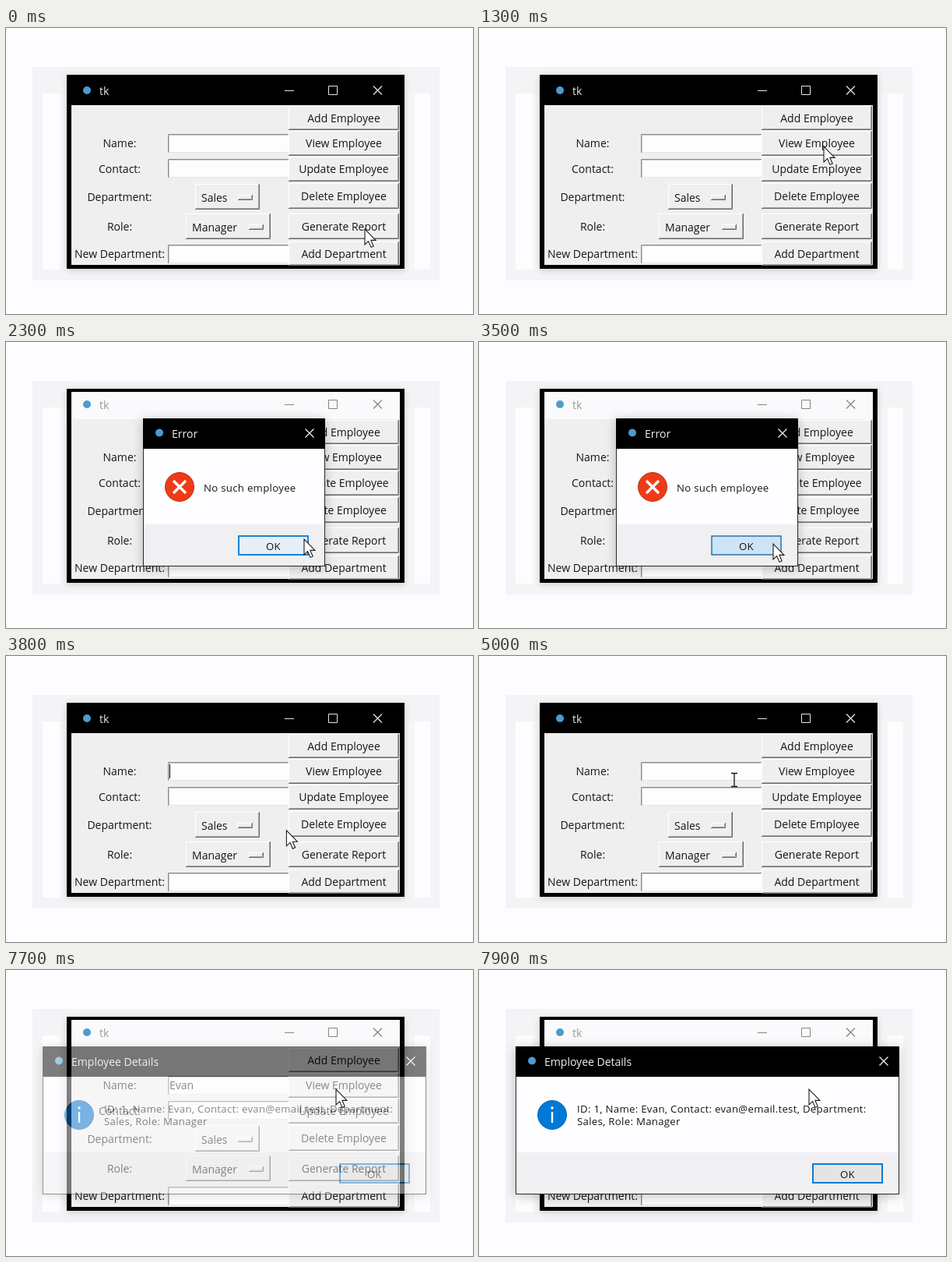
Animation, 600 px wide and 367 px high, one loop 8 s. Source, as an HTML page:

```html
<!DOCTYPE html>
<html lang="en">
<head>
<meta charset="utf-8">
<title>Employee form</title>
<style>
html, body { margin: 0; width: 100%; height: 100%; overflow: hidden; background: #fdfcfe; }
svg { display: block; }
text { font: 14px "Open Sans", "Noto Sans", sans-serif; fill: #161616; white-space: pre; }
.msg text { font-size: 13.2px; letter-spacing: .3px; }
.msg text.head { font-size: 14px; letter-spacing: 0; fill: #f2f2f2; }
.mid { text-anchor: middle; }
.win { filter: drop-shadow(0 2px 4px rgba(0,0,0,.16)); }
.msg .pane { filter: drop-shadow(0 2px 7px rgba(0,0,0,.24)); }
</style>
</head>
<body>
<svg id="stage" width="600" height="367" viewBox="0 0 600 367"></svg>
<script>
const LOOP = 8000, STEP = 100;
const NAME = "Evan", MAIL = "evan@email.test";
const stage = document.getElementById("stage");
const $ = id => document.getElementById(id);

const rect = (x, y, x2, y2, fill, more = "") =>
  `<rect x="${x}" y="${y}" width="${x2 - x}" height="${y2 - y}" fill="${fill}" ${more}/>`;
const line = (d, color, width = 1, more = "") =>
  `<path d="${d}" fill="none" stroke="${color}" stroke-width="${width}" ${more}/>`;
const text = (x, y, s, cls = "", more = "") =>
  `<text x="${x}" y="${y}" class="${cls}" ${more}>${s}</text>`;
const cross = (x, y, r) => `M${x - r} ${y - r}l${2 * r} ${2 * r}m0 ${-2 * r}l${-2 * r} ${2 * r}`;
const badge = (x, y) => `<circle cx="${x}" cy="${y}" r="5" fill="#4d9bd0"/>`;

// Raised box: light top and left edge, dark bottom and right edge
function raised(x, y, x2, y2) {
  return rect(x, y, x2, y2, "#f0eff0") +
    line(`M${x + .5} ${y2}V${y + .5}H${x2}`, "#ffffff") +
    line(`M${x + 1} ${y2 - 1.5}H${x2 - 1.5}V${y + 1}`, "#a4a4a4") +
    line(`M${x} ${y2 - .5}H${x2 - .5}V${y}`, "#696969");
}

function entry(y) {
  return rect(208, y, 363, y + 24, "#fdfcfe") +
    line(`M208.5 ${y + 24}V${y + .5}H363`, "#8b8b8b") +
    line(`M209.5 ${y + 23}V${y + 1.5}H362`, "#c9c9c9") +
    line(`M209 ${y + 23.5}H363`, "#e6e5e6");
}

function menu(x, y, x2, y2, label) {
  const m = Math.round((y + y2) / 2) - 3;
  return raised(x, y, x2, y2) + text(x + 8, m + 8.5, label) + raised(x2 - 28, m, x2 - 9, m + 7);
}

const button = (y, y2, label, base) => raised(363, y, 505, y2) + text(434, base, label, "mid");

function titleBar(id, fill, ink, glyph) {
  return `<g id="${id}">` + rect(84, 64, 506, 99, fill) + text(120, 85.5, "tk", "", `style="fill:${ink}"`) +
    line("M358 80.5H370M414.5 74.5H425.5V85.5H414.5Z", glyph) +
    line(cross(477.5, 80, 5.5), glyph, 1.2) + `</g>`;
}

function dialog(id, x, x2, head, okX, body) {
  return `<g id="${id}" class="msg">` +
    rect(x, 98, x2, 288, "#2b2b2b", 'class="pane"') +
    rect(x + 1, 137, x2 - 1, 235, "#fefdff") + rect(x + 1, 234, x2 - 1, 287, "#f0eff1") +
    rect(x, 98, x2, 137, "#000") + badge(x + 21, 116.5) +
    text(x + 37, 123, head, "head") + line(cross(x2 - 20, 117, 5.5), "#f2f2f2", 1.3) +
    rect(okX + 1, 249, okX + 90, 273, "#e4e4e5", `id="${id}Ok" stroke="#0f7cd0" stroke-width="2"`) +
    text(okX + 45.5, 266.5, "OK", "mid") + body + `</g>`;
}

const labels = [["Name:", 153], ["Contact:", 186], ["Department:", 221.5], ["Role:", 260], ["New Department:", 295]];
const buttons = [
  [100, 131, "Add Employee", 121], [132, 164, "View Employee", 153],
  [165, 197, "Update Employee", 186], [199, 232, "Delete Employee", 221],
  [238, 271, "Generate Report", 259.5], [274, 305, "Add Department", 295]
];

stage.innerHTML =
  rect(0, 0, 600, 367, "#fdfcfe") +
  rect(34, 50, 557, 324, "#f4f3f5") + rect(47, 84, 545, 310, "#fdfcfe") +
  rect(69, 84, 525, 310, "#f6f5f7") +
  rect(78, 60, 512, 309, "#000", 'class="win"') +
  rect(84, 99, 506, 304, "#f0eff0") +
  titleBar("barOn", "#000", "#e4e4e4", "#e8e8e8") + titleBar("barOff", "#faf9fb", "#9a9a9a", "#858585") +
  badge(104, 80) +
  labels.map(([s, y]) => text(146, y, s, "mid")).join("") +
  [136, 168, 278].map(entry).join("") +
  text(210, 153, "", "", 'id="typed"') + line("M0 139V157", "#111", 1, 'id="caret"') +
  menu(243, 200, 326, 233, "Sales") + menu(231, 238, 340, 271, "Manager") +
  buttons.map(b => button(...b)).join("") +
  dialog("error", 176, 410, "Error", 298,
    `<circle cx="223" cy="186" r="18.5" fill="#f03a17" stroke="#b5331c"/>` +
    line(cross(223, 186, 8), "#fff", 3.4) + text(254, 192, "No such employee")) +
  dialog("info", 47, 540, "Employee Details", 428,
    `<circle cx="94" cy="186" r="18.5" fill="#0078d7" stroke="#0c64ad"/>` +
    line("M94 182V196", "#fff", 2.4) + `<circle cx="94" cy="177" r="1.7" fill="#fff"/>` +
    text(126, 183, `ID: 1, Name: ${NAME}, Contact: ${MAIL}, Department:`) +
    text(126, 199, "Sales, Role: Manager")) +
  `<path id="arrow" d="M0 0V20L4.6 15.6L8 23.4L11.2 22L7.9 14.4H14Z" fill="#fff" stroke="#1a1a1a" stroke-width="1.1"/>` +
  line("M-4 -8.5H-1Q0 -8.5 0 -7.5Q0 -8.5 1 -8.5H4M0 -8V8M-4 8.5H-1Q0 8.5 0 7.5Q0 8.5 1 8.5H4", "#111", 1.3, 'id="beam"');

// Pointer stops: time, x, y
const path = [
  [0, 461, 258], [900, 443, 152], [1600, 443, 152], [2200, 383, 253], [2400, 383, 253],
  [2700, 378, 259], [3600, 378, 259], [4100, 328, 159], [6700, 328, 159],
  [6800, 328, 161], [6950, 328, 161], [7400, 424, 153], [LOOP, 424, 153]
];
const keys = [5600, 5700, 5900, 6000];
const caretOn = [[3700, 4000], [4300, 4900], [5200, 6600], [6800, 7400]];

const clamp = v => Math.max(0, Math.min(1, v));
const ease = p => p * p * (3 - 2 * p);
const within = (t, a, b) => t >= a && t < b;
const show = (id, on) => $(id).setAttribute("visibility", on ? "visible" : "hidden");

function pointer(t) {
  const i = path.findIndex(p => p[0] > t);
  const [a, x, y] = path[i - 1], [b, x2, y2] = path[i];
  const p = ease((t - a) / (b - a));
  return [x + (x2 - x) * p, y + (y2 - y) * p];
}

function draw(t) {
  const err = clamp((t - 1400) / 200) * clamp((3800 - t) / 200);
  const info = clamp((t - 7600) / 200);
  $("error").setAttribute("opacity", err);
  $("info").setAttribute("opacity", info);
  show("barOn", !err && !info);
  show("barOff", err || info);

  const [x, y] = pointer(t);
  const overOk = err && within(x, 298, 389) && within(y, 248, 274);
  const pressed = overOk && t >= 3400;
  const ok = $("errorOk");
  ok.setAttribute("fill", pressed ? "#cce4f5" : overOk ? "#e5eff8" : "#e4e4e5");
  ok.setAttribute("stroke", pressed ? "#1d6aa8" : "#1b83d2");
  ok.setAttribute("stroke-width", pressed ? 1.4 : 2);

  const typed = $("typed");
  typed.textContent = NAME.slice(0, keys.filter(k => t >= k).length);
  const end = typed.textContent ? typed.getComputedTextLength() : 0;
  $("caret").setAttribute("transform", `translate(${Math.round(210 + end) + .5} 0)`);
  show("caret", caretOn.some(([a, b]) => within(t, a, b)));

  const inField = !err && !info && within(x, 208, 363) && within(y, 136, 160);
  show("beam", inField);
  show("arrow", !inField);
  for (const id of ["beam", "arrow"]) $(id).setAttribute("transform", `translate(${x} ${y})`);
}

const start = performance.now();
function tick() {
  const t = (performance.now() - start) % LOOP;
  draw(Math.floor(t / STEP) * STEP);
  requestAnimationFrame(tick);
}
tick();
</script>
</body>
</html>
```
